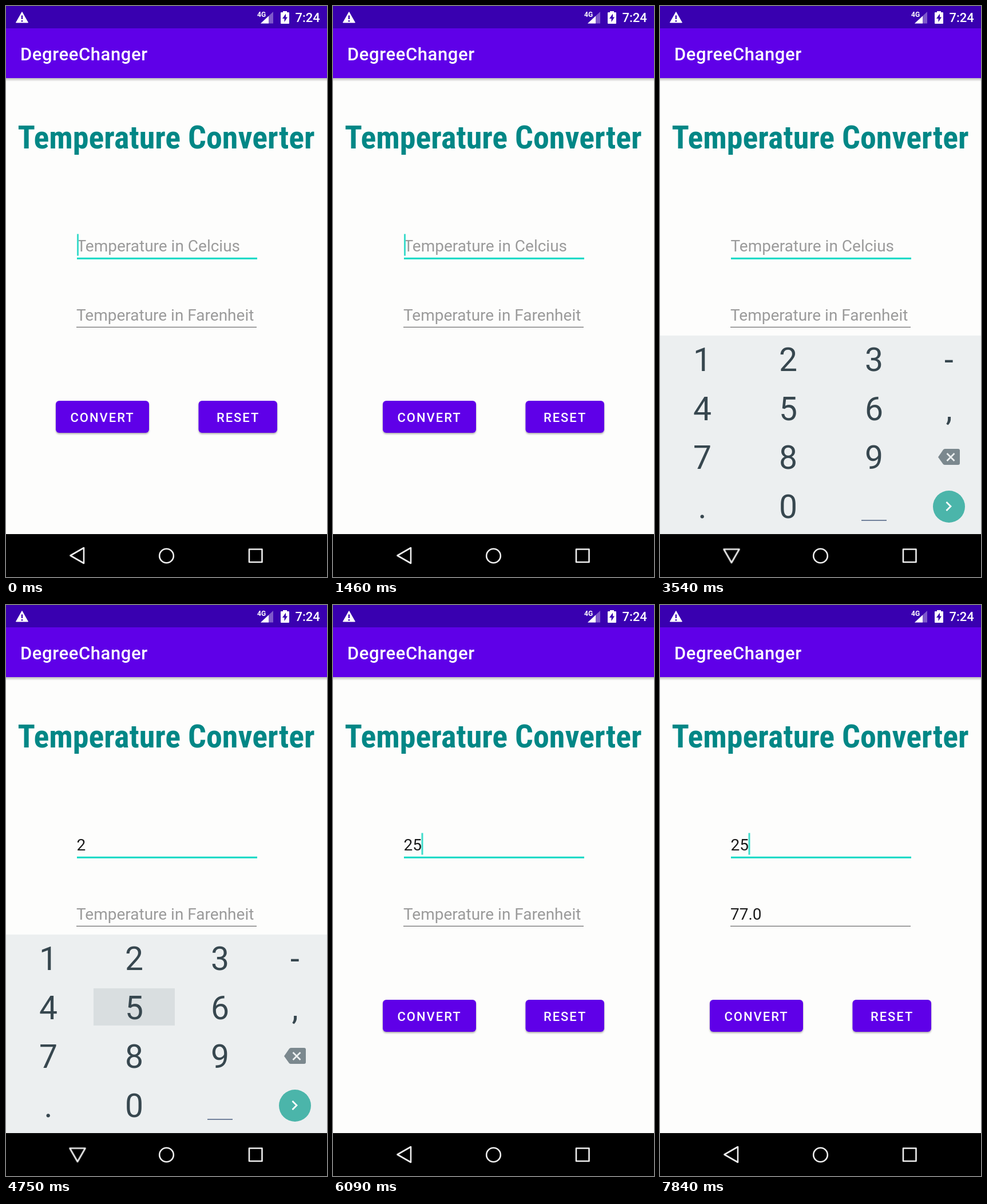
Write an HTML page that moves like this. It is 561x998 px and loops after 8 s.

```html
<!DOCTYPE html>
<html lang="en">
<head>
<meta charset="utf-8">
<title>Degree changer</title>
<style>
  html, body { margin: 0; width: 100%; height: 100%; overflow: hidden; background: #000; }
  svg { display: block; width: 561px; height: 998px; font-family: Roboto, "Open Sans", sans-serif; }

  .bar { font-size: 31px; font-weight: 500; letter-spacing: .6px; fill: #fff; }
  .clock { font-size: 22px; font-weight: 500; fill: #fff; }
  .net { font-size: 12px; font-weight: 700; fill: #fff; }
  .title { font: 700 56px "Roboto Condensed", Roboto, sans-serif; font-stretch: 75%; fill: #018786; text-anchor: middle; }
  .field { font-size: 28px; fill: #1b1b1b; }
  .hint { fill: #9b9b9b; }
  .label { font-size: 22px; font-weight: 500; letter-spacing: 1.96px; fill: #fff; }
  .keys { font-size: 57px; fill: #37474f; text-anchor: middle; }
  .nav { fill: none; stroke: #eee; stroke-width: 2.6; stroke-linejoin: round; }

  .t { animation: 8s step-end infinite; }
  .ease { animation: 8s linear infinite; }

  #caret { animation-name: blink, move; }
  #caret { animation-duration: 8s, 8s; }
  #hint1 { animation-name: hint1; }
  #digit1 { animation-name: digit1; }
  #digit2 { animation-name: digit2; }
  #hint2 { animation-name: hint2; }
  #result { animation-name: result; }
  #press { animation-name: press; }
  #pad { animation-name: pad; }
  #back { animation-name: back; transform-origin: 125px 960.5px; }
  #ripple { animation-name: ripple; transform-origin: 168px 718px; }

  @keyframes blink {
    0%, 12.5%, 25.5%, 38%, 50%, 60.5%, 72.375%, 85.5%, 98%, 100% { opacity: 1; }
    6.25%, 19.25%, 31.75%, 44.25%, 56.25%, 66.75%, 79.25%, 91.75% { opacity: 0; }
  }
  @keyframes move {
    0% { transform: none; }
    50% { transform: translateX(15.5px); }
    60.5%, 100% { transform: translateX(30.5px); }
  }
  @keyframes hint1 { 0% { visibility: visible; } 50%, 100% { visibility: hidden; } }
  @keyframes digit1 { 0% { visibility: hidden; } 50%, 100% { visibility: visible; } }
  @keyframes digit2 { 0% { visibility: hidden; } 60.5%, 100% { visibility: visible; } }
  @keyframes hint2 { 0% { visibility: visible; } 92.5%, 100% { visibility: hidden; } }
  @keyframes result { 0% { visibility: hidden; } 92.5%, 100% { visibility: visible; } }
  @keyframes press {
    0%, 50%, 60.5%, 100% { opacity: 0; transform: none; }
    49.5% { opacity: 1; transform: none; }
    59.375% { opacity: 1; transform: translateY(86px); }
  }
  @keyframes pad {
    0%, 28.25% { opacity: 0; transform: translateY(36px); animation-timing-function: cubic-bezier(0, 0, .2, 1); }
    31.25%, 73.5% { opacity: 1; transform: none; }
    75.5%, 100% { opacity: 0; transform: translateY(36px); }
  }
  @keyframes back {
    0%, 28.25% { transform: none; }
    31.25%, 73.5% { transform: rotate(-90deg); }
    76%, 100% { transform: none; }
  }
  @keyframes ripple {
    0%, 90.75% { opacity: 0; transform: scale(.3); }
    91.25% { opacity: .24; }
    93.5% { opacity: .24; transform: scale(1); }
    96.5%, 100% { opacity: 0; transform: scale(1); }
  }
</style>
</head>
<body>
<svg viewBox="0 0 561 998">
  <defs>
    <linearGradient id="shade" x2="0" y2="1">
      <stop stop-color="#000" stop-opacity=".26"/>
      <stop offset="1" stop-color="#000" stop-opacity="0"/>
    </linearGradient>
    <filter id="soft" x="-10%" y="-20%" width="120%" height="150%">
      <feDropShadow dx="0" dy="2" stdDeviation="1.5" flood-opacity=".32"/>
    </filter>
    <clipPath id="screen"><path d="M0 0H561V923H0Z"/></clipPath>
    <clipPath id="convert"><rect x="87" y="690" width="163" height="56" rx="6"/></clipPath>
  </defs>

  <path fill="#fdfdfc" d="M0 0H561V923H0Z"/>

  <!-- status and app bars -->
  <path fill="url(#shade)" d="M0 126H561V132H0Z"/>
  <path fill="#5f00e8" d="M0 39H561V126H0Z"/>
  <path fill="#3900b0" d="M0 0H561V39H0Z"/>
  <path fill="#fff" stroke="#fff" stroke-linejoin="round" d="M28 10.500L38.500 29H17.500Z"/>
  <path stroke="#3900b0" stroke-width="2.400" d="M28 16.500V23M28 25V27.400"/>
  <text class="net" x="439" y="18.500">4G</text>
  <path fill="#fff" fill-opacity=".35" d="M467 10V30.500H445Z"/>
  <path fill="#fff" d="M459 17.500V30.500H445Z"/>
  <path fill="#fff" d="M484 9H491V11H494Q495 11 495 12V30Q495 31 494 31H481Q480 31 480 30V12Q480 11 481 11H484Z"/>
  <path fill="#3900b0" d="M489 13.500L483 22H486.500V28L492 19.500H489Z"/>
  <text class="clock" x="505.500" y="28">7:24</text>
  <text class="bar" x="25" y="95">DegreeChanger</text>

  <text class="title" x="280" y="249">Temperature Converter</text>

  <!-- fields -->
  <g class="field">
    <text id="hint1" class="hint t" x="123.500" y="429">Temperature in Celcius</text>
    <text x="123.500" y="429"><tspan id="digit1" class="t">2</tspan><tspan id="digit2" class="t">5</tspan></text>
    <text id="hint2" class="hint t" x="123" y="550">Temperature in Farenheit</text>
    <text id="result" class="t" x="123" y="550">77.0</text>
  </g>
  <path fill="#0bd8c4" d="M124 439.700H439V442.700H124Z"/>
  <path fill="#6e6e6e" d="M123 560.700H438V562H123Z"/>
  <rect id="caret" class="t" x="124" y="398.500" width="3" height="38" fill="#3fdccb"/>

  <!-- buttons -->
  <g fill="#5f00e8" filter="url(#soft)">
    <rect x="87" y="690" width="163" height="56" rx="6"/>
    <rect x="336.500" y="690" width="137.500" height="56" rx="6"/>
  </g>
  <g clip-path="url(#convert)"><circle id="ripple" class="ease" cx="168" cy="718" r="86" fill="#fff"/></g>
  <text class="label" x="112.500" y="727">CONVERT</text>
  <text class="label" x="368" y="727">RESET</text>

  <!-- number pad -->
  <g clip-path="url(#screen)">
    <g id="pad" class="ease">
      <path fill="#eceff0" d="M0 576H561V923H0Z"/>
      <rect id="press" class="t" x="153" y="584" width="142" height="65" fill="#d9dee0"/>
      <g id="keys" class="keys"></g>
      <path fill="#72829c" d="M352 898H396V900H352Z"/>
      <path fill="#7b888e" d="M486 788.500L495 775.500Q496 774 498 774H521Q524 774 524 777V799Q524 802 521 802H498Q496 802 495 801Z"/>
      <path stroke="#eceff0" stroke-width="2.800" d="M501.500 782L514.500 795M514.500 782L501.500 795"/>
      <circle cx="505" cy="875" r="28" fill="#4bb5aa"/>
      <path fill="none" stroke="#fff" stroke-width="2.800" d="M500.500 867L508 874.500L500.500 882"/>
    </g>
  </g>

  <!-- navigation -->
  <path d="M0 923H561V998H0Z"/>
  <g class="nav">
    <path id="back" class="ease" d="M112.500 960.500L136 947V974Z"/>
    <circle cx="280.500" cy="961" r="12.300"/>
    <rect x="425" y="949.500" width="22.500" height="22.500"/>
  </g>
</svg>
<script>
  const cols = [74, 224, 374, 505];
  const rows = ["123-", "456,", "789", ".0"];
  document.getElementById("keys").innerHTML = rows.map((row, r) =>
    [...row].map((key, c) => `<text x="${cols[c]}" y="${638 + r * 85.7}">${key}</text>`).join("")
  ).join("");
</script>
</body>
</html>
```
